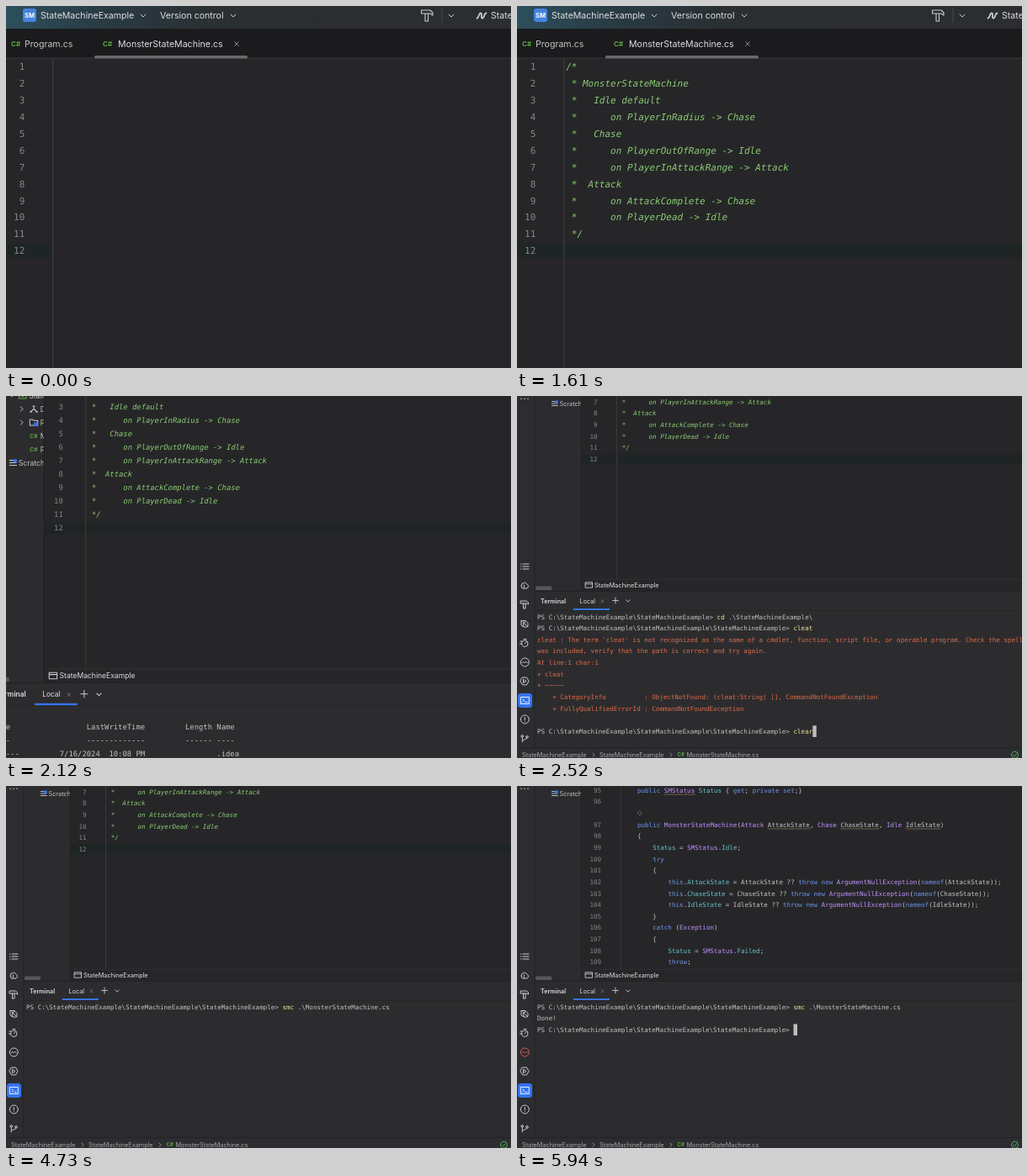
An HTML page with a canvas that plays this animation: 600x431 px, repeating every 6000 ms.

```html
<!DOCTYPE html>
<html lang="en">
<head>
<meta charset="utf-8">
<title>State machine demo</title>
<style>
html, body { margin: 0; width: 100%; height: 100%; overflow: hidden; background: #262628; }
canvas { display: block; width: 600px; height: 431px; }
</style>
</head>
<body>
<canvas id="stage" width="600" height="431"></canvas>
<script>
const ctx = document.getElementById('stage').getContext('2d');
const LOOP = 6000, ZOOM = 0.457, ROW = 13.65, CW = 4.555;
const MONO = '"DejaVu Sans Mono", "Noto Sans Mono", monospace';
const SANS = 'Inter, "Open Sans", sans-serif';
const C = {
  editor: '#262628', panel: '#2c2c2e', bar: '#2b2d30', dark: '#1b1b1d', band: '#1f2525',
  rule: '#414143', text: '#c4c4c6', bright: '#dcdde0', dim: '#7b7b7e', icon: '#c9cbd0',
  comment: '#8acb72', keyword: '#6c95eb', type: '#c191ff', method: '#39cc9b', member: '#66c3cc',
  error: '#de6b4b', command: '#ece59a', blue: '#3574f0', sharp: '#62b543', red: '#db5c5c'
};

const clamp = v => Math.max(0, Math.min(1, v));
const span = (t, a, b) => clamp((t - a) / (b - a));
const ease = p => p < 0.5 ? 4 * p ** 3 : 1 - 4 * (1 - p) ** 3;

function rect(x, y, w, h, color) {
  ctx.fillStyle = color;
  ctx.fillRect(x, y, w, h);
}

function box(x, y, w, h, r, color) {
  ctx.fillStyle = color;
  ctx.beginPath();
  ctx.roundRect(x, y, w, h, r);
  ctx.fill();
}

// Text is placed by the middle of its capitals.
function label(str, x, y, size = 7.3, color = C.text, weight = 400) {
  ctx.font = `${weight} ${size}px ${SANS}`;
  ctx.fillStyle = color;
  ctx.fillText(str, x, y + size * 0.36);
}

function mono(str, x, y, color, style = '') {
  ctx.font = `${style} 7.567px ${MONO}`;
  ctx.fillStyle = color;
  ctx.fillText(str, x, y + 2.6);
}

function icon(path, x, y, color = C.icon, width = 1) {
  ctx.save();
  ctx.translate(x, y);
  ctx.strokeStyle = color;
  ctx.lineWidth = width;
  ctx.lineJoin = ctx.lineCap = 'round';
  ctx.stroke(new Path2D(path));
  ctx.restore();
}

const DOWN = 'M-2.2 -1.1 L0 1.1 L2.2 -1.1';
const DOWN_BIG = 'M-3 -1.5 L0 1.5 L3 -1.5';
const RIGHT = 'M-1.1 -2.2 L1.1 0 L-1.1 2.2';
const CROSS = 'M-1.6 -1.6 L1.6 1.6 M-1.6 1.6 L1.6 -1.6';
const PLUS = 'M-3.5 0 H3.5 M0 -3.5 V3.5';
const RING = 'M-5 0 A5 5 0 1 1 5 0 A5 5 0 1 1 -5 0';
const HAMMER = 'M-4.5 -4 H2.5 L4.5 -2 V0 L2.5 -1 H-4.5 Z M-1.5 -1 V5 H1 V-1';

// ---- document ----
const doc = [];
let count = 0;
const add = (text = '', wavy = []) => doc.push({ n: ++count, text, wavy });
const hint = (indent, usages, apis) => doc.push({ hint: usages, apis, indent });

const states = [
  ['Idle', ['PlayerInRadius']],
  ['Chase', ['PlayerOutOfRange', 'PlayerInAttackRange']],
  ['Attack', ['AttackComplete', 'PlayerDead']]
];

function buildDoc() {
  ['/*', ' * MonsterStateMachine', ' *   Idle default', ' *      on PlayerInRadius -> Chase',
    ' *   Chase', ' *      on PlayerOutOfRange -> Idle', ' *      on PlayerInAttackRange -> Attack',
    ' *  Attack', ' *      on AttackComplete -> Chase', ' *      on PlayerDead -> Idle', ' */',
    '', '', 'using System;', 'using System.Threading.Tasks;', ''].forEach(s => add(s));
  hint(0, '2 usages', '1 exposing API');
  add('public sealed class MonsterStateMachine', ['M']);
  add('{');
  hint(4, '11 usages', '5 exposing APIs');
  add('    public enum SMStatus', ['SMStatus']);
  ['{', '    Idle,', '    Chase,', '    Attack,', '    Failed', '}', ''].forEach(s => add('    ' + s));
  for (const [name, events] of states) {
    hint(4, '4 usages', '2 exposing APIs');
    add(`    public abstract class ${name}`);
    add('    {');
    for (const e of events) {
      [`public event Action On${e};`, `public void ${e}()`, '{', `    On${e}?.Invoke();`, '}', '']
        .forEach(s => add('        ' + s));
    }
    add('        public abstract Task EnterAsync();');
    add('        public abstract Task ExitAsync();');
    add('    }');
    add();
  }
  states.forEach(([s]) => add(`    private readonly ${s} ${s}State;`));
  add();
  ['public async Task RunAsync()', '{', '    while (Status != SMStatus.Failed)', '    {',
    '        switch (Status)', '        {'].forEach(s => add('    ' + s));
  states.forEach(([s]) => add(`                case SMStatus.${s}: await ${s}State.EnterAsync(); break;`));
  ['        }', '        await Task.Yield();', '    }', '}'].forEach(s => add('    ' + s));
  while (count < 94) add();
  add('    public SMStatus Status { get; private set;}', ['SMStatus']);
  add();
  hint(4, '');
  add('    public MonsterStateMachine(Attack AttackState, Chase ChaseState, Idle IdleState)',
    ['AttackState', 'ChaseState', 'IdleState']);
  ['{', '    Status = SMStatus.Idle;', '    try', '    {'].forEach(s => add('    ' + s));
  for (const s of ['AttackState', 'ChaseState', 'IdleState']) {
    add(`            this.${s} = ${s} ?? throw new ArgumentNullException(nameof(${s}));`);
  }
  ['    }', '    catch (Exception)', '    {', '        Status = SMStatus.Failed;',
    '        throw;', '    }', '}'].forEach(s => add('    ' + s));
}
buildDoc();

const rowY = i => 75.2 + (i - 11) * ROW;
const scrollEnd = rowY(doc.findIndex(d => d.n === 97)) - 46;

const KEYWORDS = new Set(('using public sealed class enum abstract event void private readonly async while ' +
  'switch case await break get set this throw new nameof try catch').split(' '));
const TYPES = new Set(('System Threading Tasks SMStatus Idle Chase Attack Action Task Exception ' +
  'MonsterStateMachine ArgumentNullException').split(' '));

function tokenColor(tok, before, after) {
  if (KEYWORDS.has(tok)) return C.keyword;
  if (/class $/.test(before) && tok === 'MonsterStateMachine') return C.dim;
  if (/(this|SMStatus)\.$/.test(before) || /^\s+$/.test(before) && after[0] === ',') return C.member;
  if (TYPES.has(tok)) return C.type;
  if (/^\w/.test(tok) && after[0] === '(') return C.method;
  return tok === 'Status' ? C.member : C.text;
}

function codeLine(line, x, y) {
  if (line.n < 12) return mono(line.text, x, y, C.comment, 'italic');
  for (const m of line.text.matchAll(/\w+|[^\w\s]+/g)) {
    const rest = line.text.slice(m.index + m[0].length);
    mono(m[0], x + m.index * CW, y, tokenColor(m[0], line.text.slice(0, m.index), rest));
  }
  for (const word of line.wavy) {
    const start = x + line.text.indexOf(word) * CW;
    let path = `M${start} ${y + 4.6}`;
    for (let i = 1; i <= word.length * 3; i++) path += ` L${start + i * CW / 3} ${y + (i % 2 ? 5.4 : 4.6)}`;
    icon(path, 0, 0, '#a9926a', 0.6);
  }
}

function hintLine(line, x, y) {
  x += line.indent * CW;
  if (!line.hint) return icon('M0 -2.6 L2.6 0 L0 2.6 L-2.6 0 Z', x + 3, y, C.dim, 0.8);
  icon('M0 -2.5 H5 V2.5 H0 Z M1.5 1 L3.5 -1 M2 -1 H3.5 V.5', x, y, C.dim, 0.7);
  label(line.hint, x + 7.2, y, 6.4, C.dim);
  const next = x + 15 + ctx.measureText(line.hint).width;
  icon('M0 -2.5 H3 L5 0 L3 2.5 H1 V-2.5', next, y, C.dim, 0.7);
  label(line.apis, next + 7, y, 6.4, C.dim);
}

function editor(t) {
  const loaded = t >= 5290;
  const shift = loaded ? CW : 0;
  const scroll = scrollEnd * ease(span(t, 5470, 5930));
  const reveal = -82 + 172 * span(t, 60, 1290);
  const x = 120.2 + shift;
  ctx.save();
  ctx.beginPath();
  ctx.rect(76.5, -82, 640, 300);
  ctx.clip();
  rect(76, -90, 640, 310, C.editor);
  rect(76, rowY(11) - scroll - 6, 640, 12, C.band);
  const rows = (loaded ? doc : doc.slice(0, 12))
    .map((line, i) => ({ line, y: rowY(i) - scroll }))
    .filter(({ y }) => y > -90 && y < 226);
  for (const { line, y } of rows) {
    if (line.n) codeLine(line, x, y); else hintLine(line, x, y);
  }
  if (t < 1290) rect(118.5, reveal, 600, 300, C.editor);
  rect(118.2 + shift, -82, 0.7, 300, C.rule);
  ctx.textAlign = 'right';
  for (const { line, y } of rows) {
    if (line.n) mono(line.n, 95.6 + shift, y, '#868689');
  }
  ctx.textAlign = 'left';
  ctx.restore();
}

// Title bar and tabs are laid out in close-up coordinates.
function header() {
  ctx.save();
  ctx.scale(1 / (1 + ZOOM), 1 / (1 + ZOOM));
  ctx.translate(256 * ZOOM, -398 * ZOOM);
  const g = ctx.createLinearGradient(0, 0, 420, 0);
  g.addColorStop(0, '#2d4f5d');
  g.addColorStop(0.28, '#293a42');
  g.addColorStop(0.6, '#2a2f32');
  g.addColorStop(1, C.bar);
  rect(-200, -20, 1200, 47, g);
  rect(-60, 27, 1060, 35, C.dark);
  rect(-60, 61.5, 1060, 1, '#39393b');
  box(20, 3, 16, 16, 3, '#4682dc');
  label('SM', 22, 11, 7.6, '#fff', 700);
  label('StateMachineExample', 41, 11, 10.6, C.bright);
  icon(DOWN_BIG, 163, 11.5);
  label('Version control', 183, 11, 10.6, C.bright);
  icon(DOWN_BIG, 270, 11.5);
  icon('M-6.5 -6 H4 L7 -3 V0 L4 -2 H-6.5 Z M-2 -2 V7 H1.5 V-2', 500, 11, C.icon, 1.1);
  rect(517.5, 2, 1, 18, '#4a4c50');
  icon(DOWN_BIG, 529, 11.5);
  icon('M-5.5 3 C-3 3 -3.5 -3 -1 -3 C1.5 -3 -1.5 3 1 3 C3.5 3 3 -3 5.5 -3', 565, 11.5, C.icon, 1.8);
  label('StateMachineExample', 576, 11, 10.6, C.bright);
  label('C#', 6, 45, 8, C.sharp, 600);
  label('Program.cs', 22, 45, 10.6);
  label('C#', 115, 45, 8, C.sharp, 600);
  label('MonsterStateMachine.cs', 133, 45, 10.6, C.bright);
  icon('M-2.4 -2.4 L2.4 2.4 M-2.4 2.4 L2.4 -2.4', 274, 45, '#8b8c90', 1);
  box(105, 59, 182, 3.5, 1.5, '#6a6a6d');
  ctx.restore();
}

function tree() {
  rect(21, -140, 55.5, 372, C.panel);
  ctx.save();
  ctx.beginPath();
  ctx.rect(21, -100, 55, 318);
  ctx.clip();
  const y = i => 9 - i * ROW;
  icon(DOWN, 43.5, y(5), C.icon, 0.8);
  icon('M-3.5 -3 H3.5 V3 H-3.5 Z M-1 1 H1', 54.6, y(5), C.sharp, 0.9);
  label('StateMachineExample', 61, y(5));
  icon(RIGHT, 53.8, y(4), C.icon, 0.8);
  icon('M0 -2.5 V0 L-3 2.5 M0 0 L3 2.5 M-1 -3 H1 M-4 3 H-2 M2 3 H4', 66, y(4), C.icon, 0.9);
  label('Dependencies', 72.5, y(4));
  icon(RIGHT, 53.8, y(3), C.icon, 0.8);
  icon('M-4 -3 H-1 L0 -2 H4 V3 H-4 Z', 66, y(3), C.icon, 0.9);
  rect(66, y(3), 4, 3.5, C.blue);
  label('Properties', 72.5, y(3));
  label('C#', 62, y(2), 5.6, C.sharp, 600);
  label('MonsterStateMachine.cs', 72.5, y(2));
  label('C#', 62, y(1), 5.6, C.sharp, 600);
  label('Program.cs', 72.5, y(1));
  icon('M-3.5 -2.5 H0 M-3.5 0 H3 M-3.5 2.5 H3.5', 45, y(0), C.icon, 0.9);
  ctx.fillStyle = C.blue;
  ctx.beginPath();
  ctx.arc(47, y(0) - 2, 2, 0, 7);
  ctx.fill();
  label('Scratches and Consoles', 50.5, y(0));
  ctx.restore();
  rect(22, 226.5, 19, 4.5, '#565659');
  rect(76, -82, 0.8, 314, '#1e1e20');
}

function stripe(t) {
  rect(-1, -140, 22, 559, C.bar);
  rect(20.6, -140, 0.8, 559, '#1e1f22');
  for (const x of [5, 9, 13]) box(x - 0.8, 2.4, 1.6, 1.6, 0.8, C.icon);
  icon('M-4.5 -3 H-4 M-2 -3 H5 M-4.5 0 H-4 M-2 0 H5 M-4.5 3 H-4 M-2 3 H5', 9, 203);
  icon('M-1 3.5 A3.5 3.5 0 1 1 -1 -3.5 M-1 -1 A2.7 2.7 0 1 0 3 -1.5 L0 -4', 9.5, 226);
  icon(HAMMER, 9, 248);
  icon('M-4 -3.5 H1 M-4 -3.5 V2 L-1 4 M-1.5 1 A2.8 2.8 0 1 0 4 1 A2.8 2.8 0 1 0 -1.5 1 M-2 -2 L4 4', 9, 271);
  icon('M-3.4 .8 A3.7 3.7 0 1 0 4 .8 A3.7 3.7 0 1 0 -3.4 .8 M.3 .8 L2 -1 M-1 -4.5 H2 M-5 -2 H-3 M-5.5 1 H-4', 9, 294);
  icon(RING + ' M-3 .8 L-1.5 -.8 L0 .8 L1.5 -.8 L3 .8', 9.3, 317, t >= 5290 ? C.red : C.icon);
  icon('M-2.5 -4.4 H2.5 L5 0 L2.5 4.4 H-2.5 L-5 0 Z M-1.2 -2 L2 0 L-1.2 2 Z', 9, 339.5);
  box(1, 354, 17, 17, 3.5, C.blue);
  icon('M-4.8 -4 H4.8 V4 H-4.8 Z M-2.6 -1.7 L-.8 0 L-2.6 1.7 M.4 2 H2.6', 9.5, 362.5, '#fff', 0.9);
  icon(RING + ' M0 -2.4 V.6 M0 2.2 V2.4', 9.3, 385);
  icon('M-2.7 -2 V4 M-4 -3 A1.3 1.3 0 1 1 -1.4 -3 A1.3 1.3 0 1 1 -4 -3 M1.7 -2 A1.3 1.3 0 1 1 4.3 -2 ' +
    'A1.3 1.3 0 1 1 1.7 -2 M3 -.7 C3 1.5 -2 .5 -2.7 2.5', 9, 408);
}

// ---- terminal ----
const SM = 'StateMachineExample';
const outer = `PS C:\\${SM}\\${SM}> `;
const inner = `PS C:\\${SM}\\${SM}\\${SM}> `;
const gap = n => ' '.repeat(n);
const listing = [
  '',
  `Mode${gap(17)}LastWriteTime${gap(9)}Length Name`,
  `----${gap(17)}-------------${gap(9)}------ ----`,
  `d-----${gap(9)}7/16/2024  10:08 PM${gap(16)}.idea`,
  `d-----${gap(9)}7/16/2024  10:08 PM${gap(16)}${SM}`,
  `-a----${gap(9)}7/16/2024  10:08 PM${gap(11)}1012 ${SM}.sln`,
  '', ''
].map(text => ({ text }));
const errors = [
  "cleat : The term 'cleat' is not recognized as the name of a cmdlet, function, script file, or operable program. " +
    'Check the spelling of the name, or if a path',
  'was included, verify that the path is correct and try again.',
  'At line:1 char:1', '+ cleat', '+ ~~~~~',
  '    + CategoryInfo          : ObjectNotFound: (cleat:String) [], CommandNotFoundException',
  '    + FullyQualifiedErrorId : CommandNotFoundException'
].map(text => ({ text, color: C.error }));

function terminalRows(t) {
  const typed = (s, t0, step) => s.slice(0, Math.max(0, Math.floor((t - t0) / step) + 1));
  if (t < 2580) {
    const rows = [...listing, { text: outer, cmd: typed(`cd .\\${SM}\\`, 2140, 7) }];
    if (t >= 2330) rows.push({ text: inner, cmd: typed('cleat', 2340, 14) });
    if (t >= 2420) rows.push(...errors, { text: '' }, { text: inner, cmd: typed('clear', 2440, 15) });
    return rows.slice(-11);
  }
  const done = t >= 4000;
  const rows = [{ text: inner, cmd: done ? 'smc .\\MonsterStateMachine.cs' : typed('smc Mon', 3400, 85) }];
  if (t >= 4800) rows.push({ text: 'Done!' }, { text: inner, cmd: '' });
  return rows;
}

function terminal(t) {
  rect(21.4, 232, 700, 187, C.panel);
  rect(21.4, 231.8, 700, 0.8, '#1e1e20');
  rect(21.4, 255, 700, 0.6, '#222224');
  label('Terminal', 28, 244, 7.2, C.bright, 600);
  label('Local', 74.6, 244, 7.2, C.bright);
  icon(CROSS, 101.5, 244.3, '#85868a', 0.7);
  icon(PLUS, 117, 243.5, C.icon, 0.9);
  icon(DOWN, 132, 244, C.icon, 0.9);
  rect(67, 253, 43, 2, C.blue);
  const rows = terminalRows(t);
  rows.forEach((row, i) => {
    const y = 263 + i * 13.62;
    mono(row.text, 24, y, row.color || C.text);
    if (row.cmd === undefined) return;
    const [head] = row.cmd.split(' ');
    const x = 24 + row.text.length * 4.545;
    mono(head, x, y, C.command);
    mono(row.cmd.slice(head.length), x + head.length * CW, y, C.text);
    const busy = t >= 4420 && t < 4800 || t >= 5400 && t < 5660;
    if (i === rows.length - 1 && !busy) rect(x + row.cmd.length * CW, y - 6.8, 4.5, 13.6, '#bdbdbf');
  });
}

function footer() {
  rect(76.8, 218, 640, 14, C.editor);
  rect(76.8, 217.8, 640, 0.7, '#363638');
  icon('M-4 -3.2 H4 V3.2 H-4 Z M-4 -1.2 H4', 85.5, 225, C.icon, 0.9);
  label(SM, 92, 225, 7.3, C.bright);
  rect(-1, 418.6, 720, 40, C.bar);
  rect(-1, 418.4, 720, 0.7, '#1e1f22');
  const y = 427.3, grey = '#a4a6aa';
  label(SM, 6, y, 7.3, grey);
  icon(RIGHT, 91, y, grey, 0.8);
  label(SM, 98, y, 7.3, grey);
  icon(RIGHT, 183, y, grey, 0.8);
  label('C#', 190.5, y, 6, C.sharp, 600);
  label('MonsterStateMachine.cs', 201.5, y, 7.3, grey);
  icon('M-4 0 A4 4 0 1 1 4 0 A4 4 0 1 1 -4 0 M-1.7 .1 L-.4 1.5 L1.9 -1.3', 591.5, y, '#5fad65', 1);
}

function draw(t) {
  const z = ZOOM * (1 - ease(span(t, 1762, 2422)));
  ctx.setTransform(1 + z, 0, 0, 1 + z, -256 * z, 398 * z);
  rect(-10, -150, 720, 600, C.editor);
  editor(t);
  tree();
  header();
  stripe(t);
  terminal(t);
  footer();
}

const start = performance.now();
function tick() {
  draw((performance.now() - start) % LOOP);
  requestAnimationFrame(tick);
}
tick();
</script>
</body>
</html>
```
